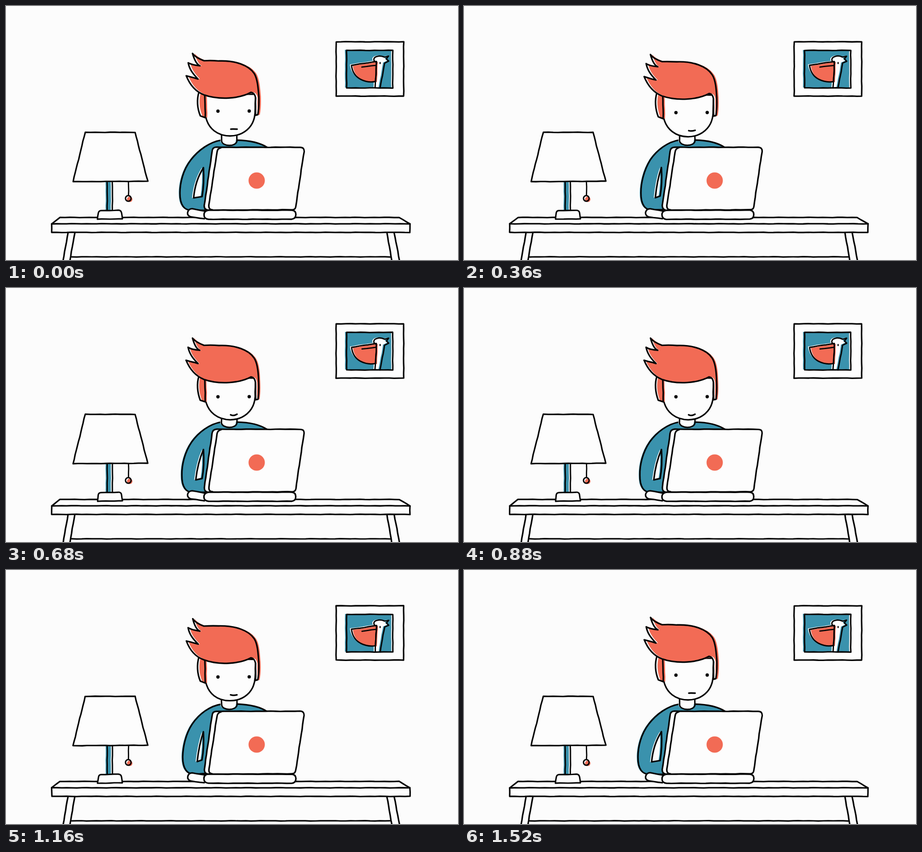
Write an HTML page that moves like this. It is 998 by 561 pixels and loops after 1560 ms.

```html
<!DOCTYPE html>
<html lang="en">
<head>
<meta charset="utf-8">
<title>Typing at the desk</title>
<style>
html, body { margin: 0; width: 100%; height: 100%; overflow: hidden; background: #fcfcfc; }
svg { display: block; width: 100vw; height: 100vh; }
</style>
</head>
<body>
<svg id="stage" viewBox="0 0 998 561" fill="none" stroke-linecap="round" stroke-linejoin="round"></svg>
<script>
const RED = '#f26b55', BLUE = '#3a92ad', WHITE = '#fdfdfd', INK = '#050505';
const LOOP = 1560, STEP = 40;
const OFF = -3.5; // blue print sits left of its outline
const stage = document.getElementById('stage');
let seed = 0;

// Hand-drawn line wobble: one smooth offset field, new for each step.
function warp(x, y) {
  const a = seed * 2.4;
  const dx = Math.sin(y * .11 + x * .04 + a) + Math.sin(y * .23 - x * .03 + a * 1.7);
  const dy = Math.sin(x * .09 - y * .05 + a * 1.3) + Math.sin(x * .19 + y * .02 + a * 2.1);
  return (x + dx * .2).toFixed(2) + ' ' + (y + dy * .2).toFixed(2) + ' ';
}

// Wobbles a path of absolute M, L, C, Q, Z commands; long lines are split.
function rough(d) {
  let out = '', px = 0, py = 0;
  for (const [, cmd, args] of d.matchAll(/([MLCQZ])([^MLCQZ]*)/g)) {
    const v = (args.match(/-?[\d.]+/g) || []).map(Number);
    if (cmd === 'L') {
      for (let i = 0; i < v.length; i += 2) {
        const parts = Math.ceil(Math.hypot(v[i] - px, v[i + 1] - py) / 11) || 1;
        for (let k = 1; k <= parts; k++) {
          out += 'L' + warp(px + (v[i] - px) * k / parts, py + (v[i + 1] - py) * k / parts);
        }
        px = v[i]; py = v[i + 1];
      }
    } else {
      out += cmd;
      for (let i = 0; i < v.length; i += 2) out += warp(px = v[i], py = v[i + 1]);
    }
  }
  return out;
}

const line = (d, w = 3.4, fill = 'none') =>
  `<path d="${rough(d)}" fill="${fill}" stroke="${INK}" stroke-width="${w}"/>`;
const fill = (d, color, dx = 0, dy = 0) =>
  `<path d="${rough(d)}" fill="${color}" transform="translate(${dx} ${dy})"/>`;
const dot = (x, y, r, color) => `<circle cx="${x}" cy="${y}" r="${r}" fill="${color}"/>`;
const shift = (dy, s) => `<g transform="translate(0 ${dy.toFixed(2)})">${s}</g>`;
const box = (x, y, r, b) => `M${x} ${y}L${r} ${y}L${r} ${b}L${x} ${b}L${x} ${y}Z`;

function picture() {
  const beak = 'M763 131L818 122.5L816 167C798 170 767 164 763 131Z';
  const bird = 'M815 181L818 124C810 122 811 115 817 112C824 109 830 110 836 113L845 111' +
    'L840 117L845 122L836 126L826 181';
  const pane = box(752, 98, 854, 181);
  return line(box(729, 79, 878, 199), 3.3, WHITE) +
    fill(pane, BLUE, OFF, -1) +
    fill(beak, WHITE, OFF, -2) + fill(bird, WHITE, OFF, -1) +
    fill(beak, RED, 3, 1) +
    line(beak, 3) + line('M786 135L817 131', 2.8) + line(bird, 3) +
    `<ellipse cx="826" cy="126" rx="1.5" ry="2.4" fill="${INK}"/>` +
    line(pane, 3.2);
}

function lamp() {
  return fill(box(223.5, 389, 235, 451), BLUE, OFF) +
    line('M223.5 389L223.5 451', 3) + line('M235 389L235 451', 3) +
    line('M202 471L204 457Q205 452 210 452L248 451Q254 451 255 457L257 470L202 471Z', 3.2, WHITE) +
    line('M175 279L285 279L313 387L148 388L175 279Z', 3.3, WHITE) +
    line('M270.5 389L270.5 418', 2.8) +
    dot(273.2, 427, 6, RED) +
    `<circle cx="270" cy="425" r="6.2" stroke="${INK}" stroke-width="3"/>`;
}

function desk() {
  return line('M137 500L126 563') + line('M152 500L141 563') +
    line('M841 500L852 563') + line('M857 500L869 563') +
    line('M145 554L848 554', 3.2) +
    line('M101 481L119 467L868 467L892 481', 3.3, WHITE) +
    line(box(101, 481, 892, 500), 3.3, WHITE);
}

function body(u) {
  const r = u ** 6, ex = 10 * u, low = 451 - 13 * r;
  const right = 577 - 10 * u ** 4;
  const arm = `M476 296C450 300 ${425 + ex * .2} 318 ${408 + ex * .5} 340` +
    `C${390 + ex} 363 ${384 + ex} 392 ${384 + ex} ${414 - 18 * r}` +
    `C${384 + ex} ${440 - 13 * r} ${394 + ex} ${low} ${408 + ex * .6} ${low}` +
    `L${425 + ex * .4} ${low}L441 ${low - 4 * r}`;
  const shoulder = `M510 296C540 297 562 303 ${right} 312`;
  const hx = 414 + 13 * u, hy = 424 - 13 * r;
  const hole = `M436 357Q${hx + 4} ${hy - 38} ${hx} ${hy}L433 ${hy - 3.5}` +
    `Q438 ${hy - 32} 436 357Z`;
  const neck = 'M476 284L476 298C478 311 508 311 510 298L510 284';
  return fill(box(418, 434, 440, 452), BLUE) +
    fill(`${arm}L470 451L470 320L${right} 312C562 303 540 297 510 296L476 296Z`, BLUE, -2.5) +
    fill(hole, WHITE, OFF) + line(hole) + line(arm) + line(shoulder) +
    fill(neck, WHITE, -2.5) + line(neck, 3.2);
}

function head(e) {
  const face = 'M439 195L440.5 243C446 272 468 287 495 287C524 287 548 268 550 236L551 195Z';
  const side = 'M426 190C421 206 422 226 429 243L440 247L439 195Z';
  const hair = 'M412 105Q418 114 437 121Q453 120 470 121C507 120 536 131 548 149' +
    'C556 161 557 184 558 200Q559 225 556 240L551 241L551 203Q549 192 541 191' +
    'C515 205 470 208 437 196C419 189 406 175 398 154L424 161C413 150 405 140 402 125' +
    'Q409 130 428 132Q418 128 412 105Z';
  const dx = 4.5 - e;
  return shift(4 * e, line(face, 3.3, WHITE)) +
    shift(5 * e, fill(side, WHITE) + fill(side, RED, dx) + line(side)) +
    shift(5.8 * e, fill(hair, WHITE) + fill(hair, RED, dx) + line(hair)) +
    shift(8.2 * e, dot(468, 232.3, 3.7, INK) + dot(537, 232, 3.7, INK) +
      line(`M496 272Q502 ${272 + 4 * e} 510 ${272 - e}`, 3.5));
}

function laptop() {
  return line('M438 470L408 466Q400 463 401 456Q403 448 411 448L440 453', 3.3, WHITE) +
    line('M465 312L649 312Q659 312 658 322L640 442Q639 450 632 450L447 451' +
      'Q437 450 438 440L455 321Q456 312 465 312Z', 3.4, WHITE) +
    line('M475 313Q467 315 466 322L448 440Q447 450 456 450') +
    dot(553.5, 385.5, 18, RED) +
    line('M447 451L631 451Q640 452 640 461Q640 470 631 471L447 471' +
      'Q437 470 437 461Q437 452 447 451Z', 3.4, WHITE);
}

// [step, arm lift]; eased between the keys
const TAPS = [[1, 0], [6, 1], [9.5, .62], [13, .93], [17.5, .38], [20, .38]];
function lift(n) {
  const i = TAPS.findIndex(k => k[0] > n);
  const [a, u] = TAPS[i - 1], [b, v] = TAPS[i];
  return u + (v - u) * (1 - Math.cos(Math.PI * (n - a) / (b - a))) / 2;
}

function render(n) {
  seed = n;
  const p = Math.max(0, (n - 1.5) / 17.5);
  const nod = (1 - Math.cos(Math.PI * p)) / 2;
  stage.innerHTML = picture() + desk() + lamp() + body(lift(n)) + head(nod) + laptop();
}

let shown = -1;
const start = performance.now();
function tick() {
  const i = Math.floor(((performance.now() - start) % LOOP) / STEP);
  const n = Math.max(1, Math.min(i, 39 - i)); // forward, then back again
  if (n !== shown) render(shown = n);
  requestAnimationFrame(tick);
}
tick();
</script>
</body>
</html>
```
